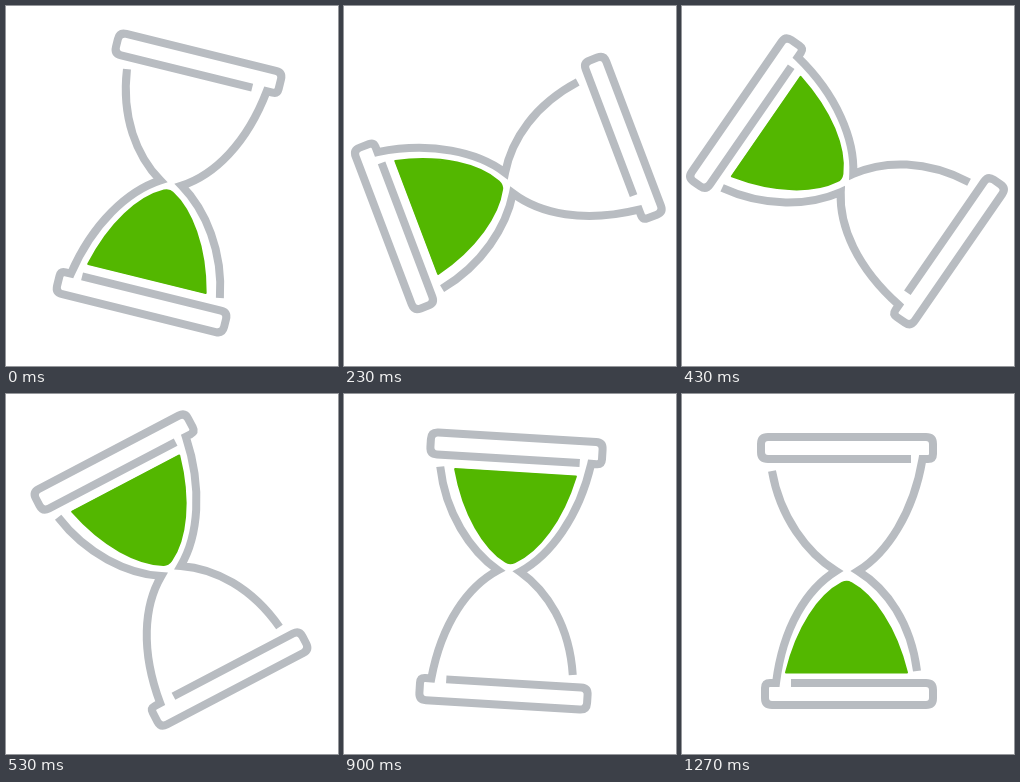
Write an HTML page that moves like this. It is 332x360 px and loops after 1330 ms.

```html
<!DOCTYPE html>
<html lang="en">
<head>
<meta charset="utf-8">
<title>Hourglass</title>
<style>
  html, body { margin: 0; width: 100%; height: 100%; overflow: hidden; background: #fff; }
  svg { display: block; width: 100%; height: 100%; }
  .glass { fill: none; stroke: #b8bcc1; stroke-width: 8; }
  .sand { fill: #53b700; stroke: #53b700; stroke-width: 2; stroke-linejoin: round; }
</style>
</head>
<body>
<svg viewBox="0 0 332 360">
  <defs>
    <path id="heap" d="M-61 98.5C-50 53 -28 21 -5 9Q0 6.5 4 9C26 21 49 53 60 98.5Z"/>
    <clipPath id="upperClip"><rect id="upper" x="-80" width="160"/></clipPath>
    <clipPath id="lowerClip"><rect id="lower" x="-80" width="160"/></clipPath>
  </defs>
  <g transform="translate(165 177)">
    <g id="turn">
      <g class="glass">
        <path d="M-64 112H79Q86 112 86 119V127Q86 134 79 134H-79Q-86 134 -86 127V117Q-86 112 -81 112H-75.5
                 C-66.5 58 -40 18 -11 0C-40 -18 -64 -52 -70 -100"/>
        <path d="M56 -112H-79Q-86 -112 -86 -119V-127Q-86 -134 -79 -134H75Q82 -134 82 -127V-117Q82 -112 77 -112H71
                 C64 -56 40 -18 11 0C40 18 67 54 75 100"/>
      </g>
      <g clip-path="url(#upperClip)"><use class="sand" href="#heap"/></g>
    </g>
    <g clip-path="url(#lowerClip)"><use class="sand" href="#heap" y="3"/></g>
  </g>
</svg>
<script>
const LOOP = 1330;
const TURN_END = 12;   // poses: the half turn ends, then two rocks, then the sand runs
const POUR_START = 20;
const POUR_STEPS = 4;

const [turn, upper, lower] = ["turn", "upper", "lower"].map(id => document.getElementById(id));

// Poses last about 1.57 ticks of a 30 Hz clock, rounded to 10 ms.
function poseAt(time) {
  const tick = Math.floor((Math.floor(time / 10) + .5) * .3);
  return Math.ceil((tick + .05) / 1.57) - 1;
}

function angleAt(pose) {
  if (pose <= TURN_END) return 180 * (pose + 1) / (TURN_END + 1);
  if (pose >= POUR_START) return 180;
  return 180 + 3.5 * Math.sin((pose - TURN_END) * Math.PI / 2);
}

function pouredAt(pose) {
  const p = Math.max(0, pose - POUR_START) / POUR_STEPS;
  return p * p * (3 - 2 * p);
}

function draw(time) {
  const pose = poseAt(time);
  const poured = pouredAt(pose);
  turn.setAttribute("transform", `rotate(${angleAt(pose)})`);
  upper.setAttribute("height", 100 - 95 * poured);
  lower.setAttribute("y", 104 - 97 * poured);
  lower.setAttribute("height", 97 * poured);
}

const start = performance.now();
function tick() {
  draw((performance.now() - start) % LOOP);
  requestAnimationFrame(tick);
}
tick();
</script>
</body>
</html>
```
